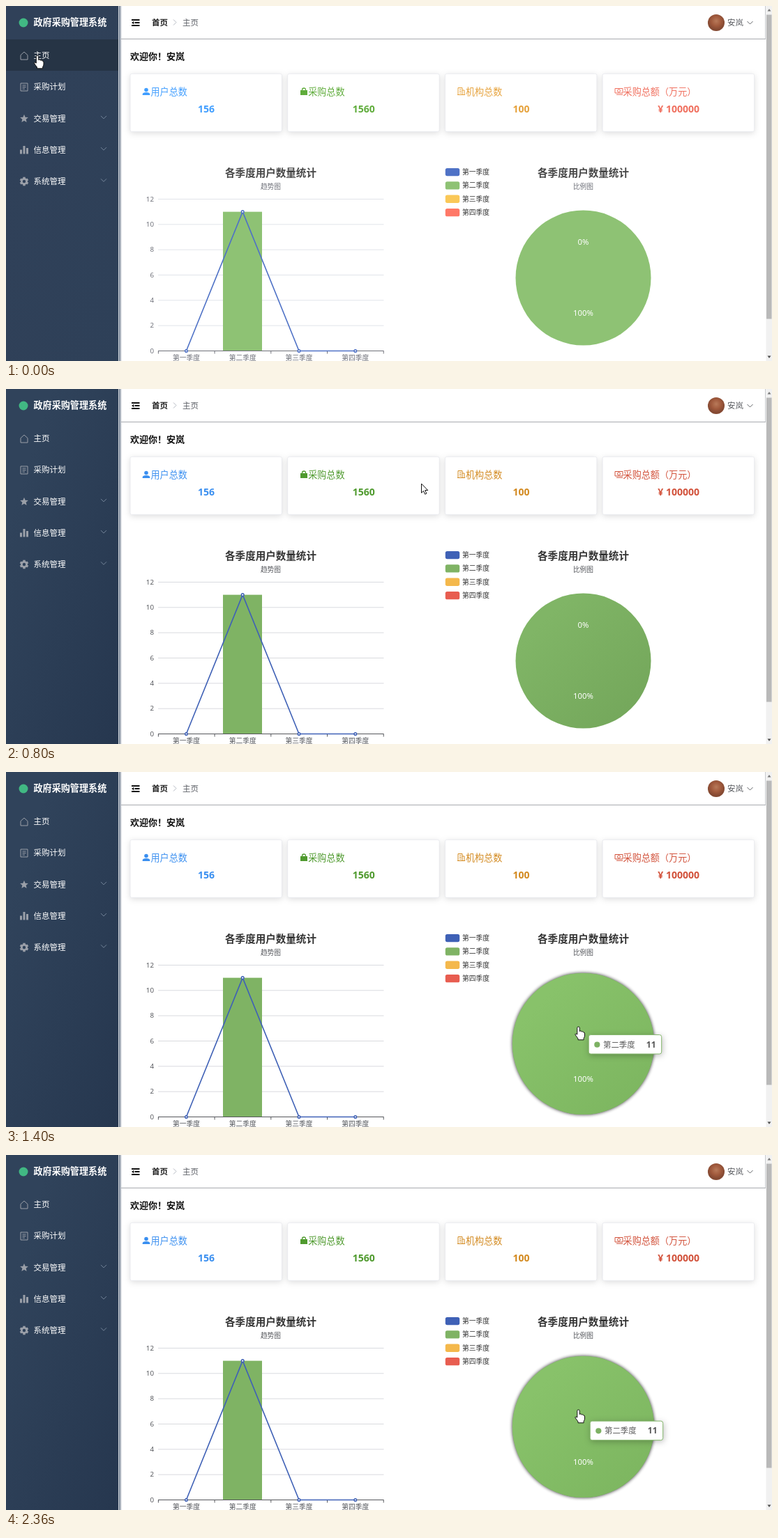
Recreate the animation shown at these times as an HTML page. Size 1098 px wide and 510 px high, loop 2.4 s.

```html
<!DOCTYPE html>
<html lang="zh-CN">
<head>
<meta charset="utf-8">
<title>管理系统主页</title>
<style>
  html, body { margin: 0; width: 100%; height: 100%; overflow: hidden; background: #fff; }
  svg {
    display: block; width: 100vw; height: 100vh;
    font-family: "Noto Sans", "Noto Sans CJK SC", "Noto Sans CJK", sans-serif;
    --side1: #30435b; --side2: #26374f; --active: #223246;
    --blue: #3a8ff0; --green: #4f9a2e; --orange: #d38a20; --red: #d2523b;
    --q1: #3f61b6; --q2: #7fb364; --q3: #f4b84c; --q4: #e85d50;
    --pie1: #80b566; --pie2: #74a75b; --grid: #d9dadf; --axis: #55575c; --title: #333;
  }
  svg.light {
    --side1: #304159; --side2: #2e4058; --active: #263445;
    --blue: #409eff; --green: #5fac3b; --orange: #e6a23c; --red: #f0705f;
    --q1: #4f72c6; --q2: #8ec274; --q3: #fac858; --q4: #ff7867;
    --pie1: #8ec274; --pie2: #8ec274; --grid: #e1e4ea; --axis: #6e7079; --title: #464646;
  }
  .card { filter: drop-shadow(0 2px 4px rgba(0, 0, 0, .13)); }
  #tip rect { filter: drop-shadow(1px 2px 4px rgba(0, 0, 0, .25)); }
</style>
</head>
<body>
<svg id="stage" viewBox="0 0 1098 510" preserveAspectRatio="none">
  <defs>
    <linearGradient id="sideFill" x1="0" y1="0" x2="1" y2="1">
      <stop offset=".2" style="stop-color:var(--side1)"/><stop offset="1" style="stop-color:var(--side2)"/>
    </linearGradient>
    <linearGradient id="pieFill" x1="0" y1="0" x2="1" y2="1">
      <stop offset=".2" style="stop-color:var(--pie1)"/><stop offset=".9" style="stop-color:var(--pie2)"/>
    </linearGradient>
    <linearGradient id="hotFill" x1="0" y1="0" x2="1" y2="1">
      <stop offset=".2" stop-color="#88c26a"/><stop offset=".9" stop-color="#7db660"/>
    </linearGradient>
    <linearGradient id="edgeFill">
      <stop offset="0" stop-color="#66758a"/><stop offset=".5" stop-color="#a9b1bc"/><stop offset="1" stop-color="#fff"/>
    </linearGradient>
    <radialGradient id="avatarFill" cy=".4">
      <stop offset="0" stop-color="#b87a5a"/><stop offset=".6" stop-color="#a0593c"/><stop offset="1" stop-color="#854a33"/>
    </radialGradient>
    <filter id="blur"><feGaussianBlur stdDeviation="2.6"/></filter>
  </defs>
  <g id="page"></g>
  <g id="pie">
    <circle id="halo" cx="827.5" cy="390.5" fill="#000" filter="url(#blur)"/>
    <circle id="disc" cx="827.5" cy="390.5" fill="url(#pieFill)"/>
    <circle id="hot" cx="827.5" cy="390.5" fill="url(#hotFill)"/>
  </g>
  <g id="pieText"></g>
  <g id="tip"></g>
  <circle id="ring" cx="42.5" cy="71" r="7" fill="#7a1418" fill-opacity=".45" stroke="#c81a12" stroke-width="3.6"/>
  <g id="cursor" fill="#fff" stroke="#111" stroke-width="1" stroke-linejoin="round">
    <path id="hand" d="M-1.7 1.5Q-1.7 0 0 0T1.7 1.5V6.5Q2.5 5.5 4 6.2 4.5 6.4 4.7 7.2 6 6.4 7 7.2 7.4 7.6 7.5 8.2 9 7.9 9 10V13Q8.8 15 7.6 16.5V18.8H-.5V17Q-4 12.5-4.7 10.8-4.5 9-1.7 11Z"/>
    <path id="arrow" d="M0 0V13.2L3 10.4 5.1 15.2 7.3 14.2 5.2 9.5H9.2Z"/>
  </g>
</svg>
<script>
const LOOP = 2400, STEP = 40;
const $ = id => document.getElementById(id);

function add(parent, tag, attrs, text) {
  const node = document.createElementNS('http://www.w3.org/2000/svg', tag);
  for (const key in attrs) node.setAttribute(key, attrs[key]);
  if (text) node.textContent = text;
  parent.append(node);
  return node;
}

const page = $('page');
const rect = (x, y, width, height, fill, more) =>
  add(page, 'rect', { x, y, width, height, style: `fill:${fill}`, ...more });
const line = (d, color, width = 1, more) =>
  add(page, 'path', { d, style: `fill:none;stroke:${color};stroke-width:${width}`, ...more });
const solid = (d, color, more) => add(page, 'path', { d, style: `fill:${color}`, ...more });
const at = (x, y) => ({ transform: `translate(${x} ${y})` });

// Places text by its vertical centre.
function label(text, x, cy, size, fill, weight = 400, anchor = 'start', parent = page) {
  return add(parent, 'text', {
    x, y: cy + size * .37, 'font-size': size, 'font-weight': weight,
    'text-anchor': anchor, style: `fill:${fill}`
  }, text);
}
const chevron = (x, y, color, size = 4) =>
  line(`M${-size} ${-size / 2}L0 ${size / 2} ${size} ${-size / 2}`, color, 1, at(x, y));

// Header
rect(162, 0, 4, 510, 'url(#edgeFill)');
rect(165, 46.8, 924, 1.2, '#b3b5b9');
rect(1088.3, 0, .8, 48, '#b3b5b9');
line('M180 20H191.500M184.500 24H191.500M180 28H191.500', '#111', 1.8);
solid('M180 24L183.300 21.700V26.300Z', '#111');
label('首页', 209, 23.5, 11.5, '#222', 700);
line('M240 19.500L244 23.500 240 27.500', '#b5b9c2');
label('主页', 253, 23.5, 11.5, '#5c5f66');
add(page, 'circle', { cx: 1018, cy: 24, r: 12, fill: 'url(#avatarFill)' });
label('安岚', 1034, 24, 11.5, '#55575c');
chevron(1066.5, 24, '#606266');

// Scrollbar
rect(1089.5, 0, 8.5, 510, '#f1f1f1');
rect(1090, 12.5, 7.5, 437, '#b9b9b9');
solid('M1091.500 7.500L1094 4 1096.500 7.500Z', '#777');
solid('M1091.500 502.500L1094 506 1096.500 502.500Z', '#505050');

// Sidebar
rect(0, 0, 161, 510, 'url(#sideFill)');
rect(161, 0, 1, 510, '#d3d8de');
const active = rect(0, 48, 161, 45, 'var(--active)');
add(page, 'circle', { cx: 25, cy: 24, r: 6.5, fill: '#41b883' });
label('政府采购管理系统', 39.5, 23.5, 13.1, '#fff', 700);

const menu = ['主页', '采购计划', '交易管理', '信息管理', '系统管理'];
const ICON = '#9a9fa8';
menu.forEach((name, i) => {
  const y = 71 + i * 45.2;
  label(name, 39.5, y, 11.5, '#fff', 500);
  if (i > 1) chevron(140, y - 1.5, '#74859a');
});
line('M-5 5.500V-1L0-5.500 5-1V5.500Z', ICON, 1, at(26, 71.5));
line('M-5-5.500H5V5.500H-5ZM-2.500-2.500H2.500M-2.500 0H2.500M-2.500 2.500H1', ICON, 1, at(26, 116.5));
const star = Array.from({ length: 10 }, (_, i) => {
  const a = i * Math.PI / 5, r = i % 2 ? 2.8 : 6.2;
  return [Math.sin(a) * r, -Math.cos(a) * r];
});
solid(`M${star.join('L')}Z`, ICON, at(26, 162));
solid('M-6 0H-3V6H-6ZM-1.500-5.500H1.500V6H-1.500ZM3-2.500H6V6H3Z', ICON, at(26, 206.5));
add(page, 'circle', { r: 3.6, fill: 'none', stroke: ICON, 'stroke-width': 2.8, ...at(26, 252) });
for (let a = 0; a < 360; a += 60)
  rect(-1.7, -6.3, 3.4, 2.6, ICON, { transform: `translate(26 252) rotate(${a})` });

// Summary cards
label('欢迎你！安岚', 178, 72.5, 13, '#111', 700);
const cards = [
  ['用户总数', '156', 'var(--blue)'],
  ['采购总数', '1560', 'var(--green)'],
  ['机构总数', '100', 'var(--orange)'],
  ['采购总额（万元）', '¥ 100000', 'var(--red)']
];
cards.forEach(([name, value, color], i) => {
  const x = 178 + i * 225.7;
  rect(x, 97.3, 217.5, 83.2, '#fff', { class: 'card', rx: 2.5, stroke: '#e6e8ed', 'stroke-width': .8 });
  label(name, x + 29.5, 123, 13.1, color);
  label(value, x + 109, 147.5, 14, color, 700, 'middle');
});
solid('M-2.800-2.500A2.800 2.800 0 1 1 2.800-2.500 2.800 2.800 0 0 1-2.800-2.500M-5.300 5V3.500Q-5 1 0 1T5.300 3.500V5Z', 'var(--blue)', at(201, 123));
solid('M-5-2H5V5H-5Z', 'var(--green)', at(427, 123));
line('M-2.500 0V-2.500Q-2.500-5 0-5T2.500-2.500V0', 'var(--green)', 1.3, at(427, 123));
line('M-4.500 5V-5H1.500V5M1.500-1.500H4.500V5M-5.500 5H5.500M-2.500-2.500H0M-2.500 0H0M-2.500 2.500H0', 'var(--orange)', 1, at(652.5, 122.5));
line('M-5.500-4H5.500V2.500H-5.500ZM-3.500 4.700H5.500M-2-.700A2 2 0 1 0 2-.700 2 2 0 1 0-2-.700', 'var(--red)', 1, at(878.5, 122.5));

// Bar and line chart
const quarters = ['第一季度', '第二季度', '第三季度', '第四季度'];
const counts = [0, 11, 0, 0];
const valueY = v => 495.5 - v * 18.17;
const quarterX = i => 258.4 + i * 80.8;
function chartTitle(x, sub) {
  label('各季度用户数量统计', x, 239.5, 14.55, 'var(--title)', 700, 'middle');
  label(sub, x, 259.5, 9.75, 'var(--axis)', 400, 'middle');
}
chartTitle(379.5, '趋势图');
for (let v = 0; v <= 12; v += 2) {
  if (v) line(`M218 ${valueY(v)}H541.500`, 'var(--grid)');
  label(String(v), 212, valueY(v) - .5, 9.75, 'var(--axis)', 400, 'end');
}
rect(311, valueY(11), 56, 199.9, 'var(--q2)');
line('M218 495.500H541.500', 'var(--axis)');
for (let i = 0; i < 5; i++) line(`M${218.4 + i * 80.7} 495.500v4`, 'var(--axis)');
quarters.forEach((name, i) => label(name, quarterX(i), 505.5, 9.75, 'var(--axis)', 400, 'middle'));
const points = counts.map((v, i) => [quarterX(i), valueY(v)]);
line(`M${points.join('L')}`, 'var(--q1)', 1.6, { 'stroke-linejoin': 'bevel' });
points.forEach(([cx, cy]) =>
  add(page, 'circle', { cx, cy, r: 1.8, style: 'fill:#fff;stroke:var(--q1);stroke-width:1.5' }));

// Pie chart
chartTitle(827.5, '比例图');
quarters.forEach((name, i) => {
  const y = 238.5 + i * 19.35;
  rect(629.8, y - 5.6, 20.4, 11.3, `var(--q${i + 1})`, { rx: 2.6 });
  label(name, 654, y - .3, 9.75, '#333');
});
const zero = label('0%', 827.5, 339, 11.3, '#fff', 400, 'middle', $('pieText'));
label('100%', 827.5, 440.5, 11.3, '#fff', 400, 'middle', $('pieText'));

const tip = $('tip');
add(tip, 'rect', { x: .2, y: .2, width: 104.5, height: 27.5, rx: 3, fill: '#fff', stroke: '#83b56b' });
add(tip, 'circle', { cx: 12.3, cy: 14.3, r: 4.1, fill: '#7db163' });
label('第二季度', 21, 14.2, 11.4, '#5c5c5c', 400, 'start', tip);
label('11', 96.5, 14, 12, '#555', 700, 'end', tip);

// Motion: rows of [ms, x, y]
const cursorPath = [
  [0, 45, 71], [80, 44.5, 70], [480, 44.5, 70], [600, 150, 76], [700, 400, 98], [800, 595.5, 136],
  [920, 700, 195], [1040, 770, 270], [1120, 800, 325], [1200, 820.5, 366]
];
const tipPath = [[1120, 797, 305], [1240, 823, 345], [1320, 831, 368], [1440, 837, 382]];
const HOVER = 1100;

const clamp = v => Math.min(1, Math.max(0, v));
function follow(path, t) {
  const next = path.findIndex(row => row[0] > t);
  if (next < 0) return path[path.length - 1].slice(1);
  if (next === 0) return path[0].slice(1);
  const a = path[next - 1], b = path[next], k = (t - a[0]) / (b[0] - a[0]);
  return [a[1] + (b[1] - a[1]) * k, a[2] + (b[2] - a[2]) * k];
}
const show = (node, on) => node.setAttribute('visibility', on ? 'visible' : 'hidden');
const move = (node, [x, y]) => node.setAttribute('transform', `translate(${x} ${y})`);

function draw(t) {
  const cursor = follow(cursorPath, t);
  const inMenu = cursor[0] < 161, onPie = t >= HOVER;
  const grow = 1 - (1 - clamp((t - HOVER) / 120)) ** 3;
  $('stage').classList.toggle('light', t < 80);
  active.setAttribute('opacity', 1 - clamp((t - 600) / 160));
  move($('cursor'), cursor);
  show($('hand'), inMenu || onPie);
  show($('arrow'), !inMenu && !onPie);
  show($('ring'), t >= 200 && t < 400);
  for (const id of ['halo', 'disc', 'hot']) $(id).setAttribute('r', 97 + 4.6 * grow);
  $('halo').setAttribute('opacity', .85 * grow);
  $('hot').setAttribute('opacity', grow);
  show(zero, !onPie);
  move(tip, follow(tipPath, t));
  tip.setAttribute('opacity', clamp((t - HOVER) / 120));
}

const start = performance.now();
function tick() {
  const t = (performance.now() - start) % LOOP;
  draw(Math.floor(t / STEP) * STEP);
  requestAnimationFrame(tick);
}
tick();
</script>
</body>
</html>
```
